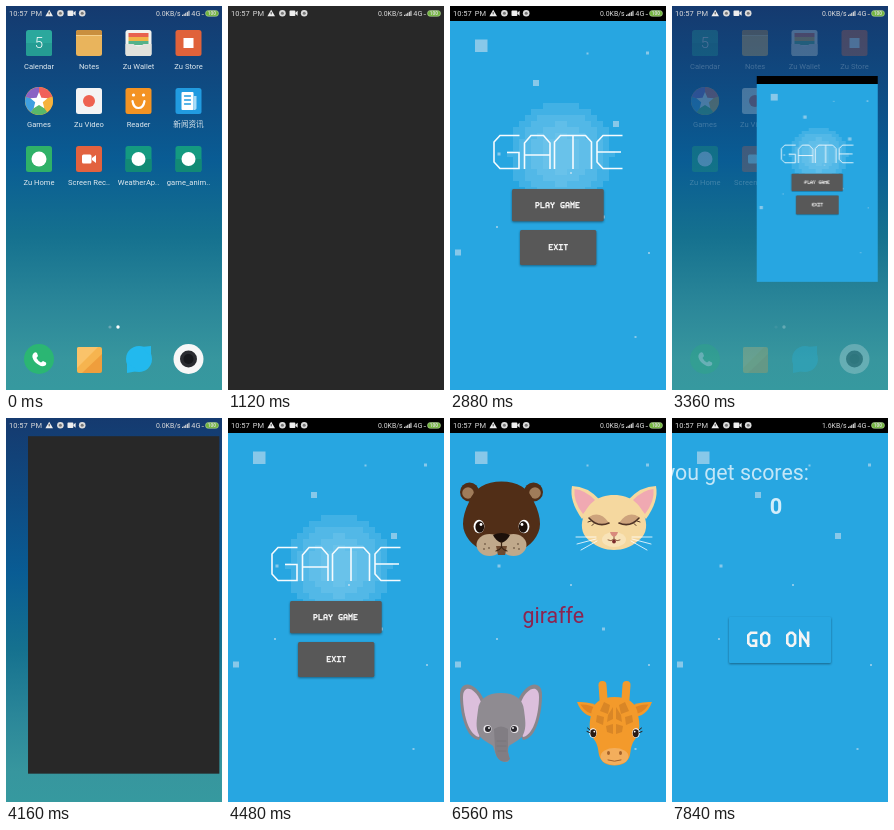
These frames come from a looping animation (216x384 px, 8 s). An HTML page:

```html
<!DOCTYPE html>
<html lang="en">
<head>
<meta charset="utf-8">
<title>Phone game demo</title>
<style>
  html, body { margin: 0; width: 100%; height: 100%; overflow: hidden; background: #282828; }
  svg { display: block; width: 100%; height: 100%; }
  text { font-family: Roboto, "Noto Sans CJK SC", "Noto Sans CJK", sans-serif; fill: #fff; }
  .label { font-size: 7.6px; text-anchor: middle; fill: #dfe9ef; }
  .info { fill: #dcdcdc; }
  .button { filter: drop-shadow(0 1px 1.2px rgba(0, 0, 0, .4)); }
  .line { fill: none; stroke-linecap: round; stroke-linejoin: round; }
</style>
</head>
<body>
<svg id="stage" viewBox="0 0 216 384" preserveAspectRatio="none"></svg>
<script>
const LOOP = 8000, STEP = 160;

const rect = (x, y, w, h, fill, more = '') =>
  `<rect x="${x}" y="${y}" width="${w}" height="${h}" fill="${fill}" ${more}/>`;
const disc = (x, y, r, fill, ry = r, more = '') =>
  `<ellipse cx="${x}" cy="${y}" rx="${r}" ry="${ry}" fill="${fill}" ${more}/>`;
const shape = (d, fill) => `<path d="${d}" fill="${fill}"/>`;
const line = (d, color, width = 1) =>
  `<path class="line" d="${d}" stroke="${color}" stroke-width="${width}"/>`;
const mirror = (cx, body) => body + `<g transform="translate(${2 * cx} 0) scale(-1 1)">${body}</g>`;

// Pixel lettering: centre lines on a 4 x 6 cell
const GLYPHS = {
  P: 'M0 5V0H2L3 1V2L2 3H0', L: 'M0 0V5H3', A: 'M0 5V1L1 0H2L3 1V5M0 3H3',
  Y: 'M0 0V1L1.5 2.5L3 1V0M1.5 2.5V5', G: 'M3 0H1L0 1V4L1 5H3V3H2',
  M: 'M0 5V0L1.5 2L3 0V5', E: 'M3 0H0V5H3M0 2.5H2', X: 'M0 0L3 5M3 0L0 5',
  I: 'M0 0H3M1.5 0V5M0 5H3', T: 'M0 0H3M1.5 0V5', O: 'M1 0H2L3 1V4L2 5H1L0 4V1Z',
  N: 'M0 5V0L3 4.5M3 0V5'
};
function pixelText(word, x, y, unit, weight = 1) {
  const letters = [...word].map((c, i) =>
    GLYPHS[c] ? `<path d="${GLYPHS[c]}" transform="translate(${i * 5 + .5} .5)"/>` : '').join('');
  return `<g role="img" aria-label="${word}" transform="translate(${x} ${y}) scale(${unit})"
    fill="none" stroke="#f4f4f4" stroke-width="${weight}" stroke-linecap="square">${letters}</g>`;
}

/* ---- home screen ---- */
const tile = (c1, c2 = c1) => rect(-13, -13, 26, 26, c1, 'rx="2.5"') +
  (c2 === c1 ? '' : shape('M-13 0H13V10.5Q13 13 10.5 13H-10.5Q-13 13 -13 10.5Z', c2));
const camera = rect(-7, -4.5, 9.5, 9, '#fff', 'rx="1.5"') + shape('M3 -1L7 -4V4L3 1Z', '#fff');
const star = Array.from({ length: 10 }, (_, i) => {
  const r = i % 2 ? 4 : 9, a = i * Math.PI / 5 - Math.PI / 2;
  return `${i ? 'L' : 'M'}${(r * Math.cos(a)).toFixed(1)} ${(r * Math.sin(a)).toFixed(1)}`;
}).join('') + 'Z';
const wheel = ['#f0615a', '#f6b23c', '#58b86a', '#3f9fe0', '#8a62c4'].map((c, i) =>
  `<path d="M0 0L0 -14A14 14 0 0 1 13.3 -4.3Z" fill="${c}" transform="rotate(${i * 72})"/>`).join('');
const greenTile = tile('#149a80', '#128a75') + disc(0, 0, 7, '#fff');

const apps = [
  ['Calendar', tile('#2ba89d', '#259c93') + '<text y="5" font-size="15" font-weight="300" text-anchor="middle">5</text>'],
  ['Notes', tile('#e9b45c') + rect(-13, -13, 26, 6, '#c98f3e', 'rx="2"') + rect(-13, -8, 26, 1, '#f4d08c')],
  ['Zu Wallet', tile('#f2f2ee') + rect(-10, -10, 20, 4, '#e8624f') + rect(-10, -6, 20, 4, '#f0b347') +
    rect(-10, -2, 20, 4, '#55b28a') + shape('M-13 1H-5Q0 6 5 1H13V11Q13 13 11 13H-11Q-13 13 -13 11Z', '#e2e2dc')],
  ['Zu Store', tile('#e0623a') + rect(-5, -5, 10, 10, '#fff')],
  ['Games', disc(0, 0, 14, '#f6b23c') + wheel + shape(star, '#fff')],
  ['Zu Video', tile('#f4f4f4') + disc(0, 0, 6, '#ee6250')],
  ['Reader', tile('#f39323') + line('M-6 0Q-5 7 0 7Q5 7 6 0', '#fff', 2.2) + disc(-5, -6, 1.6, '#fff') + disc(5, -6, 1.6, '#fff')],
  ['新闻资讯', tile('#219be0') + rect(-7, -9, 12, 18, '#fff', 'rx="1"') + shape('M5 -5H8V7Q8 9 5 9Z', '#a8dcf8') +
    line('M-4 -5H2M-4 -1H2M-4 3H2', '#219be0', 1.3)],
  ['Zu Home', tile('#2fb168') + disc(0, 0, 7.5, '#fff')],
  ['Screen Rec..', tile('#e2623f') + camera],
  ['WeatherAp..', greenTile],
  ['game_anim..', greenTile]
];
const columns = [33, 83, 132.5, 182.5];
const appGrid = apps.map(([name, art], i) => {
  const x = columns[i % 4], y = 37 + 58 * Math.floor(i / 4);
  return `<g transform="translate(${x} ${y})"><g>${art}</g>
    ${i === 11 ? rect(-13, -13, 26, 26, '#000', 'id="press" rx="2.5" opacity="0"') : ''}
    <text class="label" y="25.8">${name}</text></g>`;
}).join('');

const dock =
  disc(33, 353, 15, '#2bb673') +
  shape('M27 348Q29 345 31 347L32 350L30.5 352Q32 355 35 356.5L37 355L40 356.5Q41 359 38 360Q34 361 29 356Q25 351 27 348Z', '#fff') +
  shape('M73 341H94Q96 341 96 343V352L82 367H73Q71 367 71 365V343Q71 341 73 341Z', '#f6b44f') +
  shape('M96 348L76 367H94Q96 367 96 365Z', '#ef9e3c') + shape('M71 362L92 341H73Q71 341 71 343Z', '#fac36a') +
  disc(133, 353, 13, '#22b9ee') + shape('M121 356L121 367L132 365ZM145 350L145 340L135 341Z', '#22b9ee') +
  disc(182.5, 353, 15, '#f7f7f7') + disc(182.5, 353, 8.5, '#2a2b30') + disc(182.5, 353, 5, '#17181c');

const home = rect(0, 0, 216, 384, 'url(#dusk)') +
  `<g id="icons">${appGrid}${dock}${disc(104, 321, 1.6, '#8fb9c4', 1.6, 'opacity=".6"')}${disc(112, 321, 1.7, '#fff')}</g>`;

/* ---- game pages ---- */
const motes = [[25, 33.5, 12.5], [83, 74, 6], [163, 115, 6], [5, 243.5, 6], [196, 45.5, 3], [136.5, 46.5, 2],
  [47.5, 146.5, 3], [120, 166, 2], [152, 209.5, 3], [46, 220, 2], [198, 246, 2], [184.5, 330, 2]];
const sky = rect(0, 0, 216, 384, '#27a6e1') + rect(0, 0, 216, 15, '#000') +
  motes.map(([x, y, s]) => rect(x, y, s, s, '#c9dfee', 'opacity=".6"')).join('');

function glow() {
  let out = '';
  const cell = 6;
  for (const [radius, alpha] of [[51, .12], [42, .09], [31, .08], [20, .06]]) {
    let d = '';
    for (let y = -51; y < 51; y += cell) {
      const span = radius * radius - (y + cell / 2) ** 2;
      if (span <= 0) continue;
      const half = Math.round(Math.sqrt(span) / cell) * cell;
      d += `M${110.5 - half} ${148 + y}h${2 * half}v${cell}h${-2 * half}z`;
    }
    out += `<path d="${d}" fill="#fff" opacity="${alpha}" shape-rendering="crispEdges"/>`;
  }
  return out;
}

const heading = `<g role="img" aria-label="GAME" fill="none" stroke="#f6fbfe" stroke-width="1.6">
  <path d="M69.5 129.5H50L44 136V156L50 162.5H69V146.5H57"/>
  <path d="M74.5 163V137L81 129.5H93.5L100 137V163M74.5 149H100"/>
  <path d="M104.5 163V136L110.5 129.5H135.5L141.5 136V163M123 129.5V163"/>
  <path d="M172.5 129.5H153L147 136V156L153 162.5H172.5M147 146H171"/></g>`;

const button = (id, x, y, w, h) => `<g class="button">${rect(x, y, w, h, '#585858', 'rx="1.5"')}</g>
  <svg x="${x}" y="${y}" width="${w}" height="${h}"><circle id="${id}" cx="${w / 2}" cy="${h / 2}" r="0" fill="#fff" opacity=".2"/></svg>`;

const menu = sky + glow() + heading +
  button('playTap', 62, 183, 91.7, 32.3) + pixelText('PLAY GAME', 85.5, 196, 1, 1.25) +
  button('exitTap', 70, 224, 76.3, 35) + pixelText('EXIT', 98.8, 238, 1, 1.25);

const bear =
  mirror(51.5, disc(19.5, 74, 9.5, '#512e17') + disc(18, 75, 5.8, '#a07c5a')) +
  shape('M51.5 63.5C67 63.5 79 70 84 84C88 92 90 99 90 106C90 118 80 128 70 133H33C23 128 13 118 13 106C13 99 15 92 19 84C24 70 36 63.5 51.5 63.5Z', '#512e17') +
  mirror(51.5, disc(29, 108.5, 5.4, '#fff', 6.8) + disc(29.8, 109, 4.4, '#1c100a', 5.8) + disc(31, 106.5, 1.4, '#fff')) +
  mirror(51.5, disc(39.5, 127, 13, '#c0a98b', 11)) +
  shape('M46 128H57L55 137H48Z', '#6e4a30') +
  shape('M43 117Q51.5 113 60 117Q58 122 51.5 125Q45 122 43 117Z', '#1c100a') +
  line('M51.5 124V129M46 133Q50 132 51.5 129Q53 132 57 133', '#3a2413', 1.2) +
  mirror(51.5, disc(35, 126, .9, '#77604a') + disc(39, 130, .9, '#77604a') + disc(34, 131, .9, '#77604a'));

const cat =
  mirror(164, shape('M122 68Q119 83 132 101L150 82Q137 68 122 68Z', '#f5d89f') +
    shape('M124.5 71Q123 83 133 96L145 82Q135 72 124.5 71Z', '#f0a9b2')) +
  shape('M164 77C181 77 192 87 195 100C198 110 195 118 188 123C181 129 173 132 164 132C155 132 147 129 140 123C133 118 130 110 133 100C136 87 147 77 164 77Z', '#f5d89f') +
  mirror(164, shape('M139 99Q150 92 159 105Q149 110 139 99Z', '#cda37c') +
    line('M139 100Q148 110 159 105', '#4f3326', 1.6) + line('M141 103L138 104M144 105.5L142 107.5', '#4f3326') +
    line('M146 119L126 119M146 121L127 126M147 123L131 132', '#fff', .8)) +
  disc(164, 121.5, 12, '#f8e3b8', 7.5) +
  shape('M160 114H168Q167 118 164 119Q161 118 160 114Z', '#d98a7c') +
  line('M164 119V121M158 122Q161 124 164 121Q167 124 170 122', '#8c5a3e') + disc(164, 123.5, 1.9, '#7a2b2b', 1.9);

const elephant =
  mirror(51, shape('M34 282C26 264 10 261 10 277C10 296 16 321 29 322L38 304Z', '#8a858b') +
    shape('M31 284C25 269 13 266 13 279C13 294 18 317 29 319L35 302Z', '#dcbfdc')) +
  shape('M51 275C65 275 73 281 74 292C75 301 77 309 73 317C70 322 63 325 59 328Q57 332 59 338Q60 343 57 344Q49 344 46 337L43 328C39 325 32 322 29 317C25 309 27 301 28 292C29 281 37 275 51 275Z', '#8f8b91') +
  shape('M44 311Q51 306 58 311L58 328Q57 334 60 341Q57 345 51 343Q45 339 45 330Z', '#817d83') +
  line('M47 323H56M47 328H56M48 333H56', '#78747a', .9) +
  mirror(51, disc(37.5, 311, 4, '#e9e6ea') + disc(38, 311, 3, '#2b292f') + disc(39, 310, .9, '#fff'));

const giraffe =
  mirror(164.5, line('M154 288L152.5 267', '#f39a2b', 8) +
    shape('M148 299Q133 300 127 284Q141 283 152 290Z', '#f39a2b') + shape('M146 296Q136 296 130.5 286.5Q140 286 147 291Z', '#df8424')) +
  shape('M164.5 279C178 279 187 285 188 297C190 306 190 313 186 320C181 326 181 331 180 337C178 344 173 347.5 164.5 347.5C156 347.5 151 344 149 337C148 331 148 326 143 320C139 313 139 306 141 297C142 285 151 279 164.5 279Z', '#f39a2b') +
  mirror(164.5, shape('M154 284L160 287L158 296L150 293ZM163 289V301L157 304L158 297ZM147 297L154 299L153 307L146 304ZM163 306V316L157 314L156 308Z', '#d98626')) +
  disc(164.5, 338.5, 14, '#f3ae5c', 8.5) +
  mirror(164.5, disc(143, 315, 3.8, '#fff', 4.8) + disc(143.3, 315.3, 3, '#2b1a12', 4) + disc(144.3, 313.6, .9, '#fff') +
    line('M140 312L137.5 310M139.5 314.5L137 313.5', '#2b1a12') + disc(158.5, 335, 1.5, '#a5622a', 2)) +
  line('M158 342Q164.5 344.5 171 342', '#a5622a');

const quiz = sky + bear + cat + elephant + giraffe +
  '<text x="103.3" y="204.5" font-size="21.4" text-anchor="middle" style="fill:#8c2450">giraffe</text>';

const score = sky +
  `<text id="scoreText" y="62.3" font-size="21.4" style="fill:#c3e6f7">you get scores:</text>
   <text id="scoreValue" y="95.6" font-size="21.8" font-weight="700" text-anchor="middle" style="fill:#d3edfa">0</text>
   <g class="button">${rect(57, 199, 102, 46, '#27a6e1', 'rx="1"')}</g>` + pixelText('GO ON', 75, 213.5, 2.6);

/* ---- status bar ---- */
const ring = x => disc(x, 7.2, 3.3, '#dcdcdc') + disc(x, 7.2, 1.5, '#777');
const statusBar =
  '<text class="info" x="3" y="10" font-size="7.5">10:57</text><text class="info" x="24.8" y="10" font-size="7.5">PM</text>' +
  shape('M43.2 3.8L47 10.3H39.4Z', '#eee') + line('M43.2 6.3V8', '#333', .9) +
  ring(54.4) + rect(61.5, 4.6, 5.8, 5.4, '#eee', 'rx=".8"') + shape('M67.3 6.8L69.6 4.8V9.8L67.3 7.8Z', '#eee') + ring(76.2) +
  '<text class="info" id="speed" x="150" y="10" font-size="6.9">0.0KB/s</text>' +
  [0, 1, 2, 3, 4].map(i => rect(176 + i * 1.6, 8.8 - i, 1.1, 1.2 + i, '#dcdcdc')).join('') +
  '<text class="info" x="185.3" y="10" font-size="7.3">4G</text>' + rect(195.7, 8, 2.2, .8, '#aaa') +
  rect(199.5, 4.5, 13, 5.8, '#72b53e', 'rx="2.9" stroke="#b4cfa0" stroke-width=".6"') +
  '<text class="info" x="206" y="9.1" font-size="4.8" font-weight="700" text-anchor="middle">100</text>';

const stops = [[0, '#153a6f'], [.2, '#0f4a81'], [.4, '#095c94'], [.6, '#15718f'], [.78, '#2b8799'], [.92, '#37969e'], [1, '#36999f']];
const layer = (id, body) => `<g id="${id}">${body}</g>`;
document.getElementById('stage').innerHTML =
  `<defs><linearGradient id="dusk" x1="0" y1="0" x2="0" y2="1">${
    stops.map(([o, c]) => `<stop offset="${o}" stop-color="${c}"/>`).join('')}</linearGradient></defs>` +
  layer('home', home) +
  layer('app', layer('splash', rect(0, 0, 216, 384, '#282828')) + layer('menu', menu) + layer('quiz', quiz) + layer('score', score)) +
  layer('status', statusBar);

/* ---- motion ---- */
const el = Object.fromEntries(['icons', 'press', 'app', 'menu', 'quiz', 'score', 'playTap', 'exitTap',
  'scoreText', 'scoreValue', 'speed'].map(id => [id, document.getElementById(id)]));

const tracks = {
  press: [[0, 0], [160, .25], [480, .25], [640, 0]],
  grow: [[320, 0], [480, .12], [640, .45], [800, .87], [960, .98], [1120, 1], [3040, 1], [3200, .87],
    [3360, .5], [3520, .15], [3680, 0], [3840, 0], [4000, .42], [4160, .87], [4320, 1]],
  menu: [[1600, 0], [1760, .4], [1920, .85], [2080, 1], [3680, 1], [3840, 0], [4320, 0], [4480, 1]],
  exitTap: [[2880, 0], [3040, 28], [3200, 40], [3360, 0]],
  playTap: [[5760, 0], [5920, 26], [6080, 48], [6240, 48], [6400, 0]],
  quiz: [[5920, 216], [6080, 160], [6240, 65], [6400, 14], [6560, 0]],
  score: [[7040, 216], [7200, 160], [7360, 60], [7520, 0]],
  text: [[7520, -150], [7680, -70], [7840, -7]],
  value: [[7520, 60], [7680, 88], [7840, 104]]
};

function at(name, t) {
  const keys = tracks[name];
  if (t <= keys[0][0]) return keys[0][1];
  for (let i = 1; i < keys.length; i++) {
    const [t0, v0] = keys[i - 1], [t1, v1] = keys[i];
    if (t <= t1) return v0 + (v1 - v0) * (t - t0) / (t1 - t0);
  }
  return keys[keys.length - 1][1];
}
const set = (node, name, value) => node.setAttribute(name, value);

function render(t) {
  const p = at('grow', t);
  // The window grows out of the launcher icon's box
  const x = 169.5 * (1 - p), y = 140 * (1 - p);
  const sx = (26 + 190 * p) / 216, sy = (26 + 358 * p) / 384;
  set(el.app, 'transform', `translate(${x} ${y}) scale(${sx} ${sy})`);
  set(el.app, 'opacity', Math.min(1, p * 3));
  set(el.icons, 'opacity', Math.max(0, 1 - p * 1.5));
  set(el.press, 'opacity', at('press', t));
  set(el.menu, 'opacity', at('menu', t));
  set(el.exitTap, 'r', at('exitTap', t));
  set(el.playTap, 'r', at('playTap', t));
  for (const page of ['quiz', 'score']) {
    const shift = at(page, t);
    set(el[page], 'transform', `translate(${shift} 0)`);
    set(el[page], 'visibility', shift < 216 ? 'visible' : 'hidden');
  }
  set(el.scoreText, 'x', at('text', t));
  set(el.scoreValue, 'x', at('value', t));
  el.speed.textContent = t >= 7360 ? '1.6KB/s' : '0.0KB/s';
}

const start = performance.now();
function tick() {
  const t = (performance.now() - start) % LOOP;
  render(Math.floor(t / STEP) * STEP);
  requestAnimationFrame(tick);
}
tick();
</script>
</body>
</html>
```
